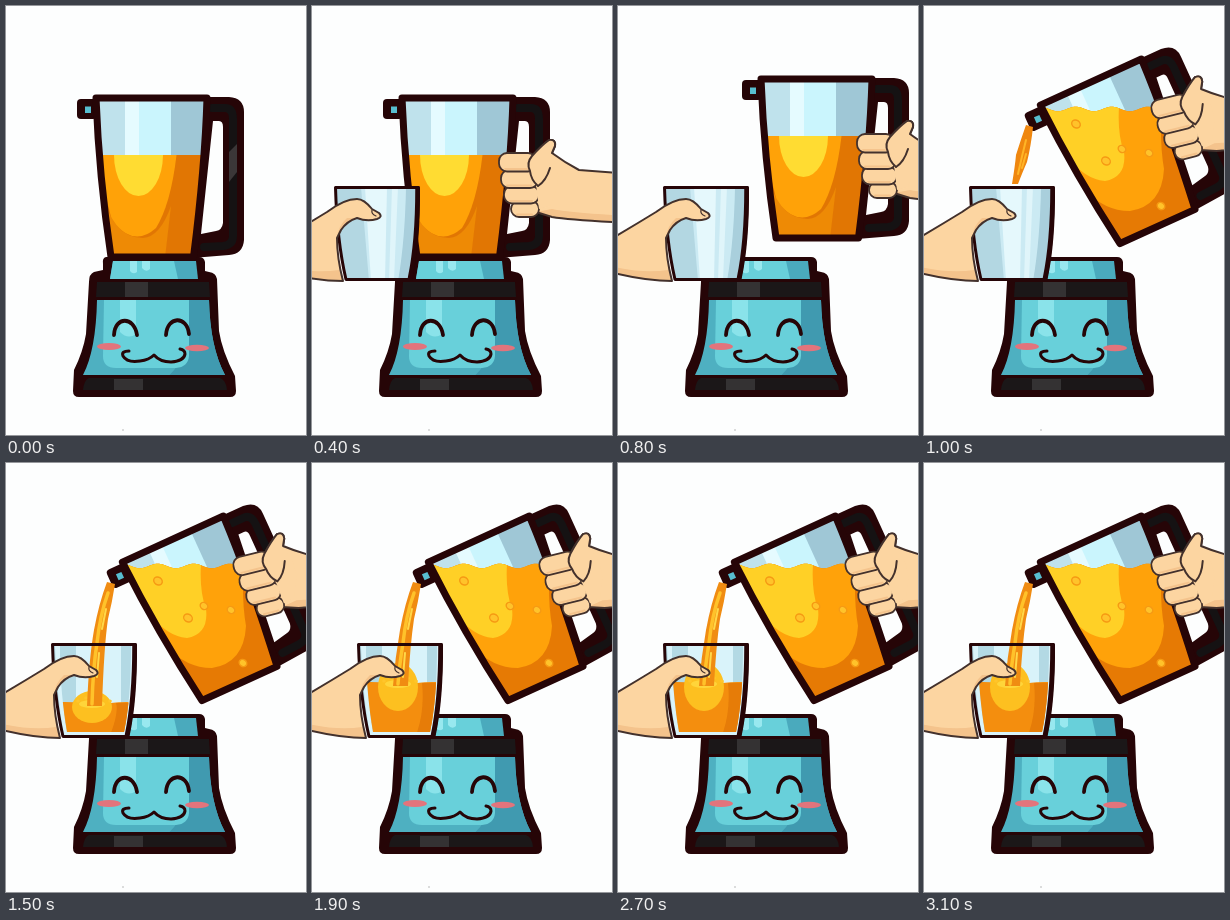
Animation of 300x429 px, one loop 3300 ms. Source, as an HTML page with a canvas:

```html
<!DOCTYPE html>
<html lang="en">
<head>
<meta charset="utf-8">
<title>Blender pouring juice</title>
<style>
  html, body { margin: 0; width: 100%; height: 100%; overflow: hidden; background: #fdfefe; }
  canvas { display: block; width: 100vw; height: 100vh; }
</style>
</head>
<body>
<canvas id="stage"></canvas>
<script>
const W = 300, H = 429, LOOP = 3300;
const INK = '#260507', SKIN = '#fcd5a1', SHADE = '#f4c38c', LINE = '#43312c';
const canvas = document.getElementById('stage');
const ctx = canvas.getContext('2d');
const ratio = Math.max(1, window.devicePixelRatio || 1);
canvas.width = W * ratio;
canvas.height = H * ratio;
ctx.scale(ratio, ratio);
ctx.lineJoin = ctx.lineCap = 'round';

// Start times of the held drawings
const STEPS = [0, 100, 200, 300, 400, 600, 700, 800, 900, 1000, 1100, 1200, 1300,
  1500, 1700, 1900, 2100, 2300, 2500, 2700, 2900, 3100];
const POUR = STEPS.indexOf(1000);

const REST = { x: 86, y: 89, a: 0, surface: 149, hx: 0, hy: 0, ha: 0 };
const LIFT = { x: 139, y: 70, a: 0, surface: 130, hx: 52, hy: -19, ha: 0 };
const TILT = { x: 111.5, y: 98, a: -24.5, surface: 103, hx: 46, hy: -57, ha: -14 };

const clamp = v => Math.min(1, Math.max(0, v));
const mix = (a, b, p) => Object.fromEntries(Object.keys(a).map(k => [k, a[k] + (b[k] - a[k]) * p]));
const rad = deg => deg * Math.PI / 180;
const glassLevel = n => Math.max(220, 280 - 10 * n);

function shape(d, fill, stroke, width = 2) {
  const path = typeof d === 'string' ? new Path2D(d) : d;
  if (fill) { ctx.fillStyle = fill; ctx.fill(path, 'evenodd'); }
  if (stroke) { ctx.strokeStyle = stroke; ctx.lineWidth = width; ctx.stroke(path); }
}
function box(x, y, w, h, fill) {
  ctx.fillStyle = fill;
  ctx.fillRect(x, y, w, h);
}
function oval(x, y, rx, ry, fill, stroke, width, turn = 0) {
  const path = new Path2D();
  path.ellipse(x, y, rx, ry, turn, 0, Math.PI * 2);
  shape(path, fill, stroke, width);
}
function roundBox(x, y, w, h, r, fill, stroke, width) {
  const path = new Path2D();
  path.roundRect(x, y, w, h, r);
  shape(path, fill, stroke, width);
}
function layer(draw) {
  ctx.save();
  draw();
  ctx.restore();
}

function drawBase() {
  shape('M100 251Q96 252 97 258V264L88 266Q83 268 83 276L80 328Q77 346 68 364L67 385Q67 391 73 391H224Q230 391 230 385L229 370Q216 345 213 325L211 273Q210 267 203 266L199 265V256Q198 251 193 251Z', INK);
  shape('M107 255H190L192 273H104Z', '#4aaabd');
  shape('M107 255H168L172 273H104Z', '#68d0da');
  shape('M124 255H131V266Q127 269 124 265ZM136 255H144V263Q140 267 136 262Z', '#98e8ef');
  shape('M91 276H203L204 291H90Z', '#1b1718');
  shape('M119 276H142V291H119Z', '#343233');

  layer(() => {
    const body = new Path2D('M91 294H203Q204 341 219 369H77Q90 344 91 294Z');
    shape(body, '#4eb0c1');
    ctx.clip(body);
    shape('M180 294H230V372H160Q188 350 180 294Z', '#409ab0');
    shape('M98 294H183V350Q182 361 170 362H110Q97 362 97 350Z', '#68d0da');
    shape('M114 294H130V328Q122 334 114 326Z', '#8ae3ea');
  });
  shape('M83 372H214Q220 374 221 384H77Q78 374 83 372Z', '#1b1718');
  shape('M108 373H137V384H108Z', '#343233');

  oval(103, 340.5, 12, 3.6, '#e2747c');
  oval(191, 342, 12, 3.2, '#e2747c');
  shape('M108 329C109 310 128 310 131 329M160 329C161 310 181 309 183 328', null, INK, 3.8);
  shape('M123 345Q115 345 117 350Q121 357 134 355Q143 354 148 349Q154 356 165 356Q178 355 179 348Q179 344 174 343', null, INK, 3);
  box(116.5, 423.5, 1, 1, '#777');
}

const JUG = new Path2D('M90 92H201Q199 160 187.5 251H105Q93 170 90 92Z');

function placeJug(pose) {
  ctx.translate(pose.x, pose.y);
  ctx.rotate(rad(pose.a));
  ctx.translate(-REST.x, -REST.y);
}

function drawStillJuice() {
  box(80, 80, 130, 180, '#e17603');
  shape('M90 60H174Q176 180 150 222Q128 242 106 215L90 150Z', '#ffa208');
  shape('M95 180Q105 232 137 232Q154 231 165 200L158 260H95Z', '#ee8a05');
  oval(132.5, 149, 24.5, 41, '#ffdc32');
}

function drawPouringJuice(odd) {
  box(100, 90, 200, 160, '#e67a04');
  shape('M105 90H238Q235 135 240 163Q238 200 206 205Q180 205 160 183L105 105Z', '#ffa20a');
  shape('M110 90H196Q192 125 200 146Q203 171 181 175Q160 173 143 150L110 105Z', '#ffd026');
  const lift = odd ? -4 : 0;
  for (const [x, y, r] of [[152, 118, 4.5], [182, 155, 4.5], [198, 143, 4], [225, 147, 4], [237, 200, 4]]) {
    oval(x + lift / 2, y + lift, r, r * 0.85, '#ffc32a', '#f69a13', 1.4, 0.6);
  }
}

function surfacePath(y, wave, phase) {
  const path = new Path2D();
  path.moveTo(60, 300);
  for (let x = 60; x <= 300; x += 3) {
    path.lineTo(x, y - wave * Math.cos((x - 188) * Math.PI / 18 + phase));
  }
  path.lineTo(300, 300);
  path.closePath();
  return path;
}

function drawJug(pose, pouring, odd) {
  layer(() => {
    placeJug(pose);
    shape('M196 91H223Q238 92 238 106V234Q237 248 223 249L186 252ZM207 115H213Q217 115 217 121V217Q216 224 210 225L195 228Z', INK);
    shape('M206 102H219Q227 102 227 113V230Q227 239 217 240L198 241', null, '#151213', 8);
    shape('M223 146L231 138V166L223 176Z', '#3b3738');
    roundBox(71, 93, 20, 20, 4, INK);
    box(79, 100.5, 6, 6.5, '#58bed0');
  });
  layer(() => {
    // Clip in jug space, then fill in stage space so the surface stays level
    const matrix = new DOMMatrix().translate(pose.x, pose.y).rotate(pose.a).translate(-REST.x, -REST.y);
    const inside = new Path2D();
    inside.addPath(JUG, matrix);
    shape(inside, '#caf5fd');
    ctx.clip(inside);
    layer(() => {
      placeJug(pose);
      box(88, 90, 31, 170, '#bfe2ec');
      box(119, 90, 14, 170, '#e5fbff');
      box(165, 90, 40, 170, '#9fc7d6');
    });
    ctx.clip(surfacePath(pose.surface, pouring ? 2.4 : 0, odd ? 2 : 0));
    if (pouring) drawPouringJuice(odd);
    else { placeJug(pose); drawStillJuice(); }
  });
  layer(() => {
    placeJug(pose);
    shape(JUG, null, INK, 7);
  });
}

function drawRightHand(pose, slide) {
  layer(() => {
    ctx.translate(207 + pose.hx + slide, 180 + pose.hy);
    ctx.rotate(rad(pose.ha));
    ctx.translate(-207, -180);
    const palm = 'M222 168L220 150Q230 139 237 134Q244 133 243 140L240 147Q252 156 267 164L360 171V219Q265 215 240 211L224 206Z';
    shape(palm, SKIN);
    shape('M224 206L240 203Q270 209 360 211V219Q265 215 240 211Z', SHADE);
    shape(palm, null, LINE);
    for (const [x, y, w, h] of [[199, 195, 28, 16], [192, 180, 35, 17.5], [189, 164, 37, 18], [187, 147, 37, 18.5]]) {
      roundBox(x, y, w, h, 8, SKIN, LINE, 1.8);
      shape(`M${x + 6} ${y + h - 2.5}H${x + w - 7}`, null, SHADE, 2);
    }
    shape('M218 165Q214 157 220 150Q230 139 237 134Q244 133 243 140L239 149Q250 165 244 185L238 200L227 203L224 178Q219 174 218 165Z', SKIN);
    shape('M226 180Q219 174 218 165Q214 157 220 150Q230 139 237 134Q244 133 243 140L240 147M226 180Q234 175 238 162', null, LINE);
  });
}

function drawStream(n) {
  if (n === 0) {
    shape('M102 119L109 121Q107 140 103 156Q99 165 94 178L88 178Q91 160 92 149Q97 133 102 119Z', '#ef870f');
    shape('M102 134Q98 150 94 168M102 148L98 162', null, '#ffb526', 2);
    return;
  }
  const sway = n % 2;
  const end = Math.min(268, glassLevel(n) + 3);
  shape(`M101 119L109 121Q106 140 102 156Q98 183 ${96 - sway} ${end}H${81 + sway}Q83 195 88 167Q93 140 101 119Z`, '#f08c12');
  shape(`M102 130Q94 152 ${91 + sway} 180Q87 205 86 ${end - 2}`, null, '#ffc22a', 3.5);
  shape(`M100 ${146 + sway * 5}L96 ${166 + sway * 5}M93 ${190 - sway * 4}L91 ${214 - sway * 4}`, null, '#ffd848', 2);
}

function drawGlassJuice(n) {
  const top = glassLevel(n);
  const odd = n % 2;
  const bump = odd ? 3 : -2;
  layer(() => {
    shape('M49 183H127Q126 240 119 272H58Q51 235 49 183Z', '#d9f3fa');
    ctx.clip(new Path2D('M53 183H125Q125 236 118 269H61Q55 235 53 183Z'));
    shape('M54 183H70V275H54ZM115 183H128V275H115Z', '#b3d9e4');
    shape(`M40 ${top}Q60 ${top + bump} 75 ${top}T105 ${top}T135 ${top}V275H40Z`, '#f48e0e');
    shape(`M110 ${top}H130V275H103Q113 250 110 ${top}Z`, '#e67c08');
    oval(86, top + 4, 20, Math.min(24, Math.max(1, (272 - top) / 2)), '#fdc020');
    oval(86, top + 1, 13, 4, '#ffd53a');
    for (let i = 0; i < 5; i++) {
      oval(72 + i * 8, top - 2 - (i * 3 + odd * 4) % 6, 1.8, 1.5, '#ffc52b');
    }
  });
}

function drawLeftSide(x, n) {
  layer(() => {
    ctx.translate(x, 0);
    const glass = new Path2D('M46.5 181.5H129.5Q130 236 122 273.5H57Q48 235 46.5 181.5Z');
    shape(glass, '#cbeaf3');
    layer(() => {
      ctx.clip(glass);
      shape('M45 181H72L80 275H50Z', '#b3d7e2');
      shape('M76 181H98L96 275H82Z', '#e5f8fc');
      shape('M103 181H109L105 275H100Z', '#e0f5fa');
      shape('M117 181H132V275H109Q116 235 117 181Z', '#a9cfdc');
    });
    if (n > 1) drawGlassJuice(n);
    if (n >= 0) drawStream(n);
    shape(glass, null, INK, 3);
    shape('M128.5 183Q128.5 236 121 272', null, INK, 4.5);

    const hand = 'M-8 234L0 229Q20 217 38 206Q55 193 68 193Q75 193 83 203L90 207Q94 211 88 213Q78 216 68 212Q58 215 52 224L48 232Q48 252 54 275Q30 275 0 268L-8 266Z';
    shape(hand, SKIN);
    shape('M-8 260Q25 268 50 264L54 275Q30 275 0 268L-8 266Z', SHADE);
    shape('M68 212Q58 215 52 224L48 232Q49 220 58 212Z', SHADE);
    shape(hand, null, LINE);
    shape('M83 204Q82 208 87 210', null, LINE, 1.2);
  });
}

function render(time) {
  let step = 0;
  while (step + 1 < STEPS.length && STEPS[step + 1] <= time) step++;
  const away = (1 - clamp(step / 4)) ** 1.5;
  const raise = clamp((step - 4) / 3);
  const tilt = clamp((step - 7) / 2);
  const pose = tilt ? mix(LIFT, TILT, tilt) : mix(REST, LIFT, raise);
  const n = step - POUR;

  box(0, 0, W, H, '#fdfefe');
  drawBase();
  drawJug(pose, n >= 0, n >= 0 && n % 2 === 1);
  if (step) {
    drawRightHand(pose, 120 * away);
    drawLeftSide(-23 * (1 - raise) - 110 * away, n);
  }
}

const start = performance.now();
function tick() {
  render((performance.now() - start) % LOOP);
  requestAnimationFrame(tick);
}
tick();
</script>
</body>
</html>
```
